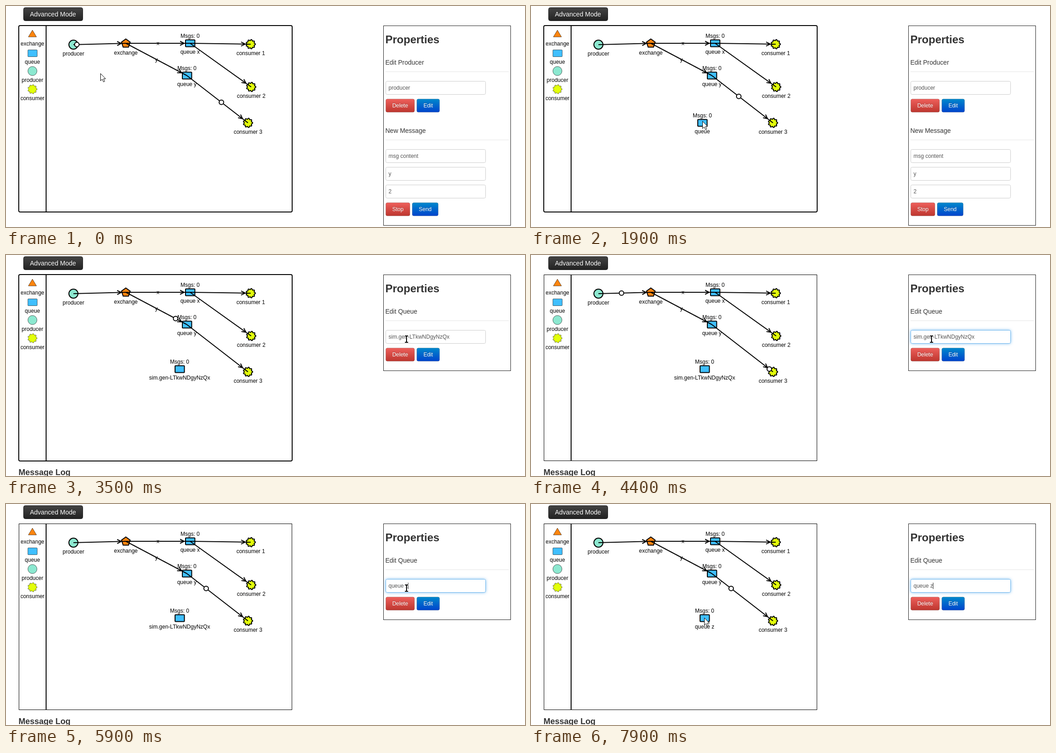
Animation of 1139x486 px, one loop 8 s. Source, as an HTML page:

```html
<!DOCTYPE html>
<html lang="en">
<head>
<meta charset="utf-8">
<title>Message flow simulator</title>
<style>
html, body { margin: 0; width: 100%; height: 100%; overflow: hidden; background: #fff; }
svg { display: block; width: 1139px; height: 486px; }
text { font: 12px "Liberation Sans", Arial, sans-serif; white-space: pre; }
.mid { text-anchor: middle; }
.h { fill: #333; font-weight: bold; }
.legend { font-size: 14px; fill: #333; }
.field { fill: #555; }
.btn { fill: #fff; text-shadow: 0 -1px 0 rgba(0, 0, 0, .25); }
.option { font: bold 13px "Noto Sans", "Open Sans", sans-serif; fill: #333; }
.box { fill: #fff; stroke: #ccc; }
.focus .box { stroke: #6cb5ee; filter: drop-shadow(0 0 3px rgba(82, 168, 236, .7)); }
.menu { fill: #fff; stroke: #ccc; stroke-opacity: .7; filter: drop-shadow(0 1px 2px rgba(0, 0, 0, .25)); }
.node { stroke: #000; stroke-width: 2; }
.icon { stroke: #000; stroke-width: 1; stroke-opacity: .6; }
.edge { fill: none; stroke: #000; stroke-width: 2; }
</style>
</head>
<body>
<svg id="stage" viewBox="0 0 1139 486"></svg>
<script>
const LOOP = 8000, STEP = 100;
const SEGMENT = 800, INTERVAL = 2000, LEAD = 52;
const GEN = 'sim.gen-LTkwNDgyNzQx';
const T = { grab: 1000, drop: 2600, focus: 3700, rename: 6000 };
const KEYS = [[4500, 'q'], [4700, 'qu'], [4900, 'que'], [5000, 'queu'], [5100, 'queue'], [5300, 'queue '], [5600, 'queue z']];

const P = {
  producer: [148, 85], exchange: [263, 82], qx: [404, 82], qy: [397, 153],
  c1: [537, 84], c2: [538, 178], c3: [531, 257]
};
const ROUTE = [P.producer, P.exchange, P.qy, P.c3];

// time, x, y of the pointer tip
const POINTER = [
  [0, 207, 148], [100, 207, 148], [800, 52, 100], [1000, 52, 100],
  [1700, 458, 265], [1900, 376, 253], [2100, 381, 247], [2700, 381, 247],
  [3300, 879, 185], [6100, 879, 185], [6400, 480, 287], [6700, 364, 252],
  [7200, 364, 252], [7600, 380, 250], [8000, 380, 250]
];

const label = (x, y, s, cls = 'mid') => `<text x="${x}" y="${y}" class="${cls}">${s}</text>`;
const points = list => list.map(p => p.map(v => v.toFixed(1)).join()).join(' ');

function ring(x, y, n, radius) {
  return points(Array.from({ length: n }, (_, i) => {
    const a = i / n * 2 * Math.PI - Math.PI / 2, r = radius(a);
    return [x + r * Math.cos(a), y + r * Math.sin(a)];
  }));
}

const shape = {
  triangle: (x, y, c) => `<path class="${c}" fill="#ff850f" d="M${x} ${y - 9}l9 15h-18z"/>`,
  exchange: (x, y, c) => `<polygon class="${c}" fill="#ff850f" points="${ring(x, y + .5, 5, () => 10)}"/>`,
  queue: (x, y, c) => `<rect class="${c}" fill="#40bfff" x="${x - 10}" y="${y - 7.5}" width="20.5" height="15" rx="1"/>`,
  producer: (x, y, c) => `<circle class="${c}" fill="#8ce8d0" cx="${x}" cy="${y}" r="10"/>`,
  consumer: (x, y, c) => `<polygon class="${c}" fill="#e2ff0a" points="${ring(x, y, 72, a => 9.2 + 1.2 * Math.cos(9 * a))}"/>`
};

const queue = ([x, y], name) =>
  shape.queue(x, y, 'node') + label(x, y - 12, 'Msgs: 0') + label(x, y + 23, name);
const consumer = ([x, y], name) => shape.consumer(x, y, 'node') + label(x, y + 24, name);

function edge([x1, y1], [x2, y2], gap) {
  const d = Math.hypot(x2 - x1, y2 - y1), a = Math.atan2(y2 - y1, x2 - x1) * 180 / Math.PI;
  return `<path class="edge" transform="translate(${x1} ${y1}) rotate(${a})" d="M0 0H${d}M${d - gap - 9} -4.5L${d - gap} 0l-9 4.5"/>`;
}

const rule = y => `<path d="M833 ${y + .5}H1103" stroke="#e5e5e5"/>`;
const input = (y, s, cls = '') =>
  `<g class="${cls}"><rect class="box" x="833.5" y="${y + .5}" width="219" height="29" rx="3"/>${label(839.5, y + 19, s, 'field')}</g>`;
const button = (x, y, w, s, fill) =>
  `<rect x="${x + .5}" y="${y + .5}" width="${w - 1}" height="29" rx="3.5" fill="url(#${fill})" stroke="#000" stroke-opacity=".18"/>` +
  label(x + w / 2, y + 19, s, 'mid btn');
const gradient = (id, a, b) =>
  `<linearGradient id="${id}" x2="0" y2="1"><stop stop-color="${a}"/><stop offset="1" stop-color="${b}"/></linearGradient>`;

const legend = [['triangle', 'exchange'], ['queue', 'queue'], ['producer', 'producer'], ['consumer', 'consumer']]
  .map(([kind, name], i) => shape[kind](58, [62, 104, 143, 183][i], 'icon') + label(58, 87 + 40 * i, name)).join('');

const stage = document.getElementById('stage');
stage.innerHTML = `
<defs>${gradient('dark', '#444', '#222')}${gradient('red', '#ee5f5b', '#bd362f')}${gradient('blue', '#0088cc', '#0044cc')}</defs>
<rect x="38.5" y="3.5" width="130" height="29" rx="4" fill="url(#dark)" stroke="#222"/>
<text x="103" y="23" class="mid btn" style="font-size:14px">Advanced Mode</text>
<rect id="frame" fill="none" stroke="#000"/>
<path d="M88 43V453" stroke="#000" stroke-width="2"/>
${legend}
${shape.producer(...P.producer, 'node')}${label(148, 109, 'producer')}
${shape.exchange(...P.exchange, 'node')}${label(263, 107, 'exchange')}
${queue(P.qx, 'queue x')}${queue(P.qy, 'queue y')}
${consumer(P.c1, 'consumer 1')}${consumer(P.c2, 'consumer 2')}${consumer(P.c3, 'consumer 3')}
${edge(P.producer, P.exchange, 10)}${edge(P.exchange, P.qx, 13)}${edge(P.exchange, P.qy, 13)}
${edge(P.qx, P.c1, 12)}${edge(P.qx, P.c2, 14)}${edge(P.qy, P.c3, 15)}
${label(333.5, 86, 'x')}${label(330, 122, 'y')}
<g id="fresh"></g><g id="dots"></g>
<text id="log" x="27.5" y="484" class="h" style="font-size:18px">Message Log</text>
<rect id="panel" x="828.5" y="43.5" width="279" fill="none" stroke="#222"/>
<text x="832.5" y="82" class="h" style="font-size:24px">Properties</text>
<text id="title" x="832.5" y="129" class="legend"></text>
${rule(144)}
${button(833, 204, 64, 'Delete', 'red')}${button(901, 204, 51, 'Edit', 'blue')}
<g id="name">${input(165, '')}<path id="caret" stroke="#222" d="M0 173V187"/></g>
<g id="compose">${label(832.5, 279, 'New Message', 'legend')}${rule(294)}
${input(315, 'msg content')}${input(354, 'y')}${input(393, '2')}
${button(833, 432, 54, 'Stop', 'red')}${button(891, 432, 58, 'Send', 'blue')}</g>
<g id="menu"><rect class="menu" x="832.5" y="195.5" width="221"/>${label(844, 227, 'queue x', 'option')}<text id="second" x="844" y="265" class="option">queue</text></g>
<path id="arrow" d="M.5 .5V16.5L4.2 13 7 19 9.6 17.8 7 12H11.6Z" fill="#fff" stroke="#000"/>
<g id="beam" fill="none"><path d="M-3.5-7H3.5M0-7V7M-3.5 7H3.5" stroke="#fff" stroke-width="4"/><path d="M-3.5-7H3.5M0-7V7M-3.5 7H3.5" stroke="#000" stroke-width="2"/></g>`;

const $ = id => document.getElementById(id);
const nameText = $('name').querySelector('text');
const menuBox = $('menu').querySelector('rect');
const show = (id, on) => $(id).setAttribute('display', on ? 'inline' : 'none');
const set = (el, attrs) => Object.entries(attrs).forEach(([k, v]) => el.setAttribute(k, v));

function pointerAt(t) {
  const i = POINTER.findIndex(k => k[0] > t);
  const [t0, x0, y0] = POINTER[i - 1], [t1, x1, y1] = POINTER[i];
  const u = (t - t0) / (t1 - t0), e = u * u * (3 - 2 * u);
  return [x0 + (x1 - x0) * e, y0 + (y1 - y0) * e];
}

function dot(age) {
  const i = Math.floor(age / SEGMENT), u = age / SEGMENT - i;
  if (i > 2) return '';
  const [a, b] = [ROUTE[i], ROUTE[i + 1]];
  return `<circle class="node" fill="#fff" r="5" cx="${a[0] + (b[0] - a[0]) * u}" cy="${a[1] + (b[1] - a[1]) * u}"/>`;
}

function drawDots(t) {
  // the flow stalls for one step while the new queue is created
  const clock = t < 2500 ? t : t - STEP;
  const age = (clock + LEAD) % INTERVAL;
  $('dots').innerHTML = dot(age) + dot(age + INTERVAL);
}

function drawQueue(t, [x, y]) {
  const dragged = t > T.grab && t < T.drop;
  const at = dragged ? [x, y + 4] : [381, 251];
  const name = t < T.drop ? 'queue' : t < T.rename ? GEN : 'queue z';
  $('fresh').innerHTML = t >= T.drop || dragged && x > 80 ? queue(at, name) : '';
}

function drawPanel(t) {
  const created = t >= T.drop, focused = t >= T.focus;
  const key = KEYS.filter(k => k[0] <= t).pop();
  const typed = key ? key[1] : created ? GEN : 'producer';
  $('title').textContent = created ? 'Edit Queue' : 'Edit Producer';
  nameText.textContent = typed;
  set($('name'), { class: focused ? 'focus' : '' });
  set($('panel'), { height: created ? 211 : 439 });
  set($('frame'), focused
    ? { x: 28.5, y: 43.5, width: 599, height: 409, rx: 0, 'stroke-width': 1 }
    : { x: 28, y: 43, width: 600, height: 410, rx: 3, 'stroke-width': 2 });
  show('compose', !created);
  show('log', created);

  const blinkOn = t < 5600 || (t - 5600) % 1000 < 500;
  show('caret', key && blinkOn);
  if (key) set($('caret'), { transform: `translate(${Math.round(839.5 + nameText.getComputedTextLength()) + .5})` });

  const two = t < 5300;
  show('menu', key && t < 5600);
  show('second', two);
  set(menuBox, { height: two ? 90 : 52.5 });
}

function draw(t) {
  const [x, y] = pointerAt(t);
  const overField = x > 833 && x < 1053 && y > 165 && y < 195;
  drawDots(t);
  drawQueue(t, [x, y]);
  drawPanel(t);
  show('arrow', !overField);
  show('beam', overField);
  set($(overField ? 'beam' : 'arrow'), { transform: `translate(${Math.round(x)} ${Math.round(y)})` });
}

const start = performance.now();
function tick() {
  const t = (performance.now() - start) % LOOP;
  draw(Math.floor(t / STEP) * STEP);
  requestAnimationFrame(tick);
}
tick();
</script>
</body>
</html>
```
